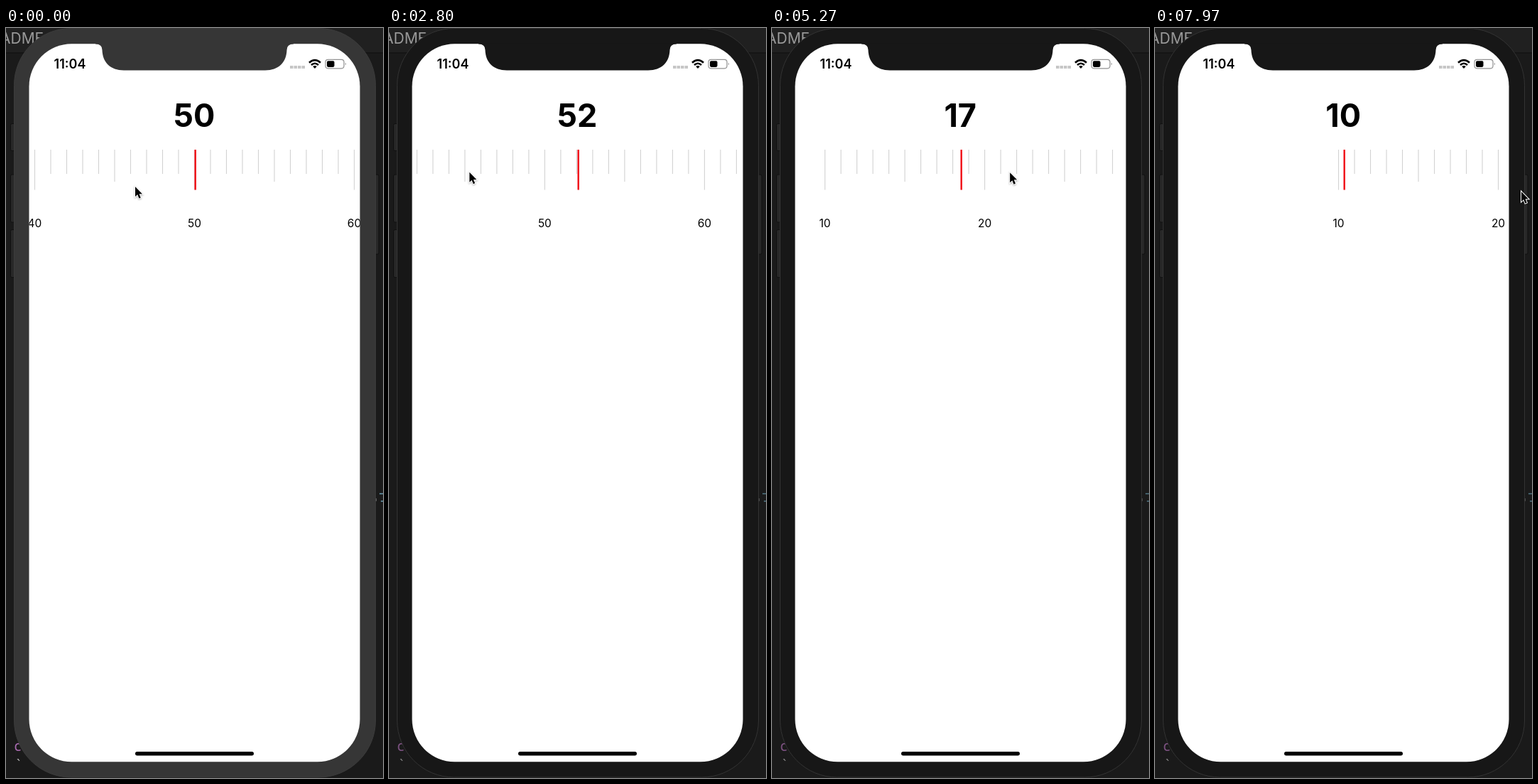
Write an HTML page that moves like this. It is 531 px wide and 1054 px high and loops after 8000 ms.

```html
<!DOCTYPE html>
<html>
<head>
<meta charset="utf-8">
<style>
  html, body { margin: 0; width: 531px; height: 1054px; overflow: hidden; background: #1a1a1a; }
  svg { display: block; font-family: Inter, sans-serif; }
  .bezel { fill: #363636; }
  .case { stroke: #3c3c3c; }
  .dim .bezel { fill: #171717; }
  .dim .case { stroke: #333; }
  .dim .code { opacity: .7; }
  #pointer { filter: drop-shadow(0 1px 1px rgba(0, 0, 0, .3)); }
</style>
</head>
<body>
<svg id="stage" width="531" height="1054" viewBox="0 0 531 1054">
  <defs>
    <clipPath id="screen"><rect x="32.5" y="22.3" width="466" height="1009" rx="60"/></clipPath>
  </defs>

  <rect width="531" height="34" fill="#202020"/>
  <rect y="34" width="531" height="2" fill="#151515"/>
  <text x="-8" y="22" font-size="21" fill="#999">ADME</text>
  <g class="code" font-family="Noto Sans Mono, monospace" font-size="19">
    <text x="11" y="1016" fill="#a96bb0">c</text>
    <text x="12" y="1042" fill="#aaa">`</text>
    <path d="M520.5 661v4" stroke="#aaa" stroke-width="2"/>
    <path d="M526 654.5h5M528 665h3" stroke="#6a9fb5" stroke-width="1.5"/>
  </g>

  <g fill="#282828" stroke="#101010">
    <rect x="6.5" y="134.5" width="8" height="38" rx="2"/>
    <rect x="6.5" y="206" width="8" height="67" rx="2"/>
    <rect x="6.5" y="283.5" width="8" height="67" rx="2"/>
    <rect x="517" y="206" width="8" height="112" rx="2"/>
  </g>
  <rect class="bezel case" x="11.5" y=".5" width="509" height="1052.5" rx="80"/>
  <rect width="531" height="1054" fill="#fff" clip-path="url(#screen)"/>
  <path class="bezel" d="M126 21.5v1Q135.500 22.500 135.500 31C136 48 147 59.500 166 59.500H365C384 59.500 395 48 395.500 31Q395.500 22.500 405 22.500v-1Z"/>

  <text x="90" y="57" font-size="18" font-weight="600" text-anchor="middle">11:04</text>
  <path d="M400 55h22" stroke="#c6c6c6" stroke-width="4" stroke-dasharray="4.500 1"/>
  <g fill="none" stroke="#000" stroke-width="2.6">
    <path d="M427 48.800Q435 41.500 443 48.800M430 52Q435 47.500 440 52"/>
    <path d="M435 57l-2.800-2.900q2.800-2.300 5.600 0z" fill="#000" stroke="none"/>
  </g>
  <rect x="450" y="44.300" width="26" height="12.500" rx="3.500" fill="none" stroke="#929292" stroke-width="1.200"/>
  <rect x="452" y="46.200" width="10.500" height="8.700" rx="1.800"/>
  <path d="M477.800 48.500q2 2 0 4z" fill="#888"/>

  <text id="readout" x="265.200" y="138.500" font-size="45" font-weight="700" text-anchor="middle"></text>
  <g clip-path="url(#screen)"><g id="ruler" font-size="15.500" text-anchor="middle"></g></g>
  <path d="M266.700 171V227.500" stroke="#f00814" stroke-width="2.400"/>
  <rect x="182" y="1017" width="167" height="5.500" rx="2.750"/>
  <path id="pointer" d="M0 0V14L3.200 11L5.400 16.500L7.800 15.400L5.600 10.200H10Z" stroke="#fff" stroke-width="2" paint-order="stroke"/>
</svg>
<script>
const LOOP = 8000, STEP = 22.5, CENTER = 265.5, MIN = 10.31;
const SPEED = 0.6;            // drag speed, px per ms
const SLOP = 15;              // travel before the ruler follows
const TAU = 100;              // settling time constant after release
const PAUSE = 70, RETURN = 300;
const HOME = { x: 130, y: 192 };
const START = { release: 0, x: 182, y: 223, value: 50 };
const $ = id => document.getElementById(id);

// Each swipe: release time, pointer at release, value it settles on
const swipes = [
  [1800, 391, 204, 39.16],
  [2600, 102, 210, 52.16],
  [3340, 320, 208, 44],
  [4265, 313, 203, 33],
  [5130, 369, 205, 17],
  [5960, 220, 203, MIN],
  [7120, 134, 187, 20],
  [7930, 516, 230, MIN]
].map(([release, x, y, value]) => ({ release, x, y, value }));

// Swipes to the right begin at HOME, swipes to the left where the pointer rests
swipes.forEach((swipe, i) => {
  swipe.before = swipes[i - 1] || START;
  swipe.from = swipe.x > HOME.x && swipe.value < swipe.before.value ? HOME : swipe.before;
  swipe.press = swipe.release - Math.abs(swipe.x - swipe.from.x) / SPEED;
});

const clamp01 = u => Math.min(1, Math.max(0, u));
const smooth = u => u * u * (3 - 2 * u);
const fling = u => u * u * (2 - u);
const mix = (a, b, k) => ({ x: a.x + (b.x - a.x) * k, y: a.y + (b.y - a.y) * k });

function pointerAt(t) {
  const s = swipes.find(s => t < s.release);
  if (!s) return swipes[swipes.length - 1];
  if (t >= s.press) return mix(s.from, s, fling((t - s.press) / (s.release - s.press)));
  return mix(s.before, s.from, smooth(clamp01((t - s.before.release - PAUSE) / RETURN)));
}

function rulerAt(t) {
  let value = START.value, label = value;
  swipes.forEach((s, i) => {
    if (t < s.press) return;
    const moved = pointerAt(Math.min(t, s.release)).x - s.from.x;
    const drag = Math.sign(moved) * Math.max(0, Math.abs(moved) - SLOP);
    label = value = Math.max(MIN, value - drag / STEP);
    if (t < s.release) return;
    label = s.value;
    const next = swipes[i + 1];
    const settling = Math.min(t, next ? next.press : LOOP) - s.release;
    value = s.value + (value - s.value) * Math.exp(-settling / TAU);
  });
  return { value, label: Math.round(label) };
}

let marks = '';
for (let n = 10; n <= 80; n++) {
  const x = n * STEP, end = n % 10 === 0 ? 227.5 : n % 5 === 0 ? 216 : 205;
  marks += `<path d="M${x} 171V${end}" stroke="#d2d2d2" stroke-width="1.1"/>`;
  if (n % 10 === 0) marks += `<text x="${x}" y="279.5">${n}</text>`;
}
$('ruler').innerHTML = marks;

function draw() {
  const t = performance.now() % LOOP;
  const { value, label } = rulerAt(t), { x, y } = pointerAt(t);
  $('ruler').setAttribute('transform', `translate(${CENTER - value * STEP})`);
  $('readout').textContent = label;
  $('pointer').setAttribute('transform', `translate(${x} ${y})`);
  $('stage').classList.toggle('dim', t >= swipes[0].press);
  requestAnimationFrame(draw);
}
draw();
</script>
</body>
</html>
```
